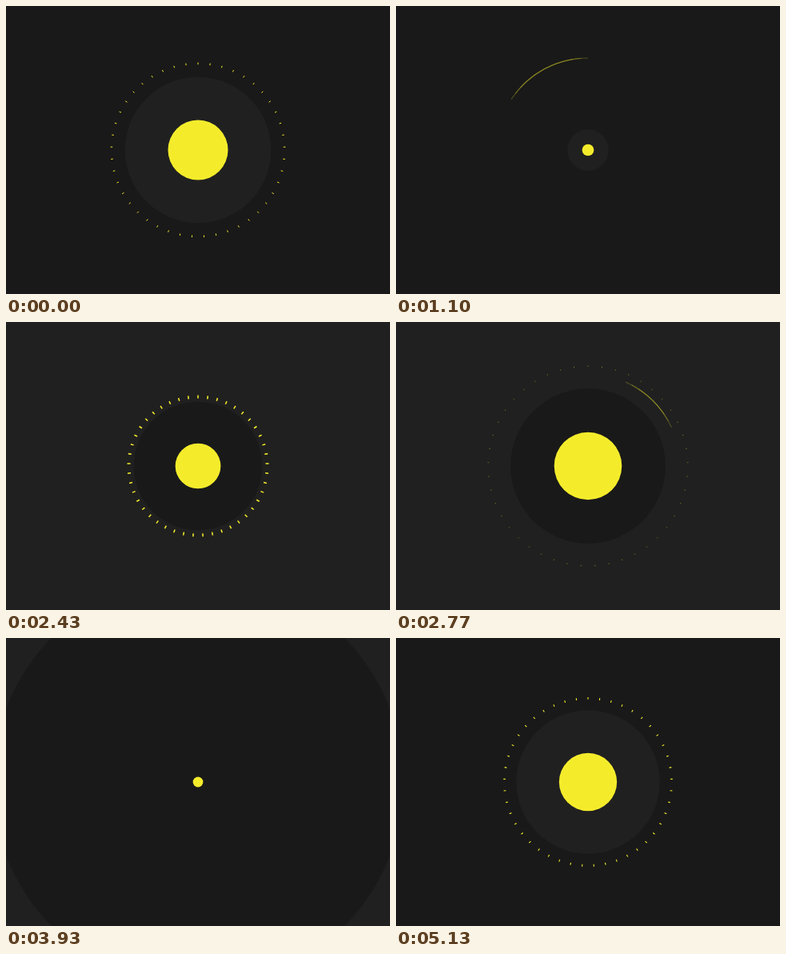
Recreate the animation shown at these times as an HTML page. Size 480x360 px, loop 5.16 s.

```html
<!DOCTYPE html>
<html lang="en">
<head>
<meta charset="utf-8">
<title>Pulsing dot</title>
<style>
  html, body { margin: 0; width: 100%; height: 100%; overflow: hidden; background: #191919; }
  svg { display: block; width: 100vw; height: 100vh; }
</style>
</head>
<body>
<svg viewBox="0 0 480 360">
  <rect id="back" width="480" height="360"/>
  <g transform="translate(240 180)">
    <circle id="disc"/>
    <g id="arcs" fill="none" stroke="#f4ec2b" stroke-width="1.1"></g>
    <path id="ticks" fill="none" stroke="#f4ec2b"/>
    <circle id="dot" fill="#f4ec2b"/>
  </g>
</svg>
<script>
// Each beat blows a ring out of the dot, then floods the stage with the other shade.
const LOOP = 5160, BEAT = LOOP / 2, LEAD = 450;
const SHADES = ['#191919', '#202020'];
const TICKS = 45, ARC_RADIUS = 115;
const DOT_SMALL = 6.4, DOT_LARGE = 43;

const el = id => document.getElementById(id);
const set = (node, attrs) => {
  for (const name in attrs) node.setAttribute(name, attrs[name]);
};

const progress = (s, from, to) => Math.min(1, Math.max(0, (s - from) / (to - from)));
const quadIn = u => u * u;
const cubicInOut = u => u < .5 ? 4 * u ** 3 : 1 - 4 * (1 - u) ** 3;
const settle = (s, rate) => 1 - Math.exp(-rate * s);

// The dot starts swelling shortly before its beat begins.
function dotRadius(s) {
  const swell = t => cubicInOut(progress(t, -318, 837));
  const shrink = cubicInOut(progress(s, 901, 1701));
  return DOT_SMALL + (DOT_LARGE - DOT_SMALL) * (swell(s) - shrink + swell(s - BEAT));
}

function discRadius(s) {
  const ring = 100 * settle(s, .0054) * (1 - quadIn(progress(s, 718, 1358)));
  const flood = 330 * cubicInOut(progress(s, 1358, 2074));
  return ring + flood;
}

const polar = (r, turn) => {
  const a = (turn - .25) * 2 * Math.PI;
  return `${(r * Math.cos(a)).toFixed(2)} ${(r * Math.sin(a)).toFixed(2)}`;
};

// Nested strokes make the ends of the arc taper.
const strokes = [0, .012, .026].map(inset => {
  const node = document.createElementNS('http://www.w3.org/2000/svg', 'path');
  node.setAttribute('stroke-opacity', .24);
  el('arcs').append(node);
  return { node, inset };
});

function drawArc(s) {
  const head = progress(s, 450, 1504), tail = quadIn(progress(s, 284, 1664));
  for (const { node, inset } of strokes) {
    const from = tail + inset, to = head - inset;
    const large = to - from > .5 ? 1 : 0;
    node.setAttribute('d', to > from
      ? `M${polar(ARC_RADIUS, from)}A${ARC_RADIUS} ${ARC_RADIUS} 0 ${large} 1 ${polar(ARC_RADIUS, to)}`
      : '');
  }
}

function drawTicks(s) {
  const size = quadIn(1 - progress(s, 0, 1060));
  const r = 147 * settle(s, .00295), half = 3.9 * size;
  let d = '';
  for (let i = 0; size > 0 && i < TICKS; i++) {
    const turn = i / TICKS;
    d += `M${polar(Math.max(0, r - half), turn)}L${polar(r + half, turn)}`;
  }
  set(el('ticks'), { d, 'stroke-width': 3 * size });
}

function render(time) {
  const t = (time + LEAD) % LOOP;
  const beat = Math.floor(t / BEAT), s = t % BEAT;
  set(el('back'), { fill: SHADES[beat] });
  set(el('disc'), { r: discRadius(s), fill: SHADES[1 - beat] });
  set(el('dot'), { r: dotRadius(s) });
  drawArc(s);
  drawTicks(s);
}

const start = performance.now();
function tick() {
  render(performance.now() - start);
  requestAnimationFrame(tick);
}
tick();
</script>
</body>
</html>
```
